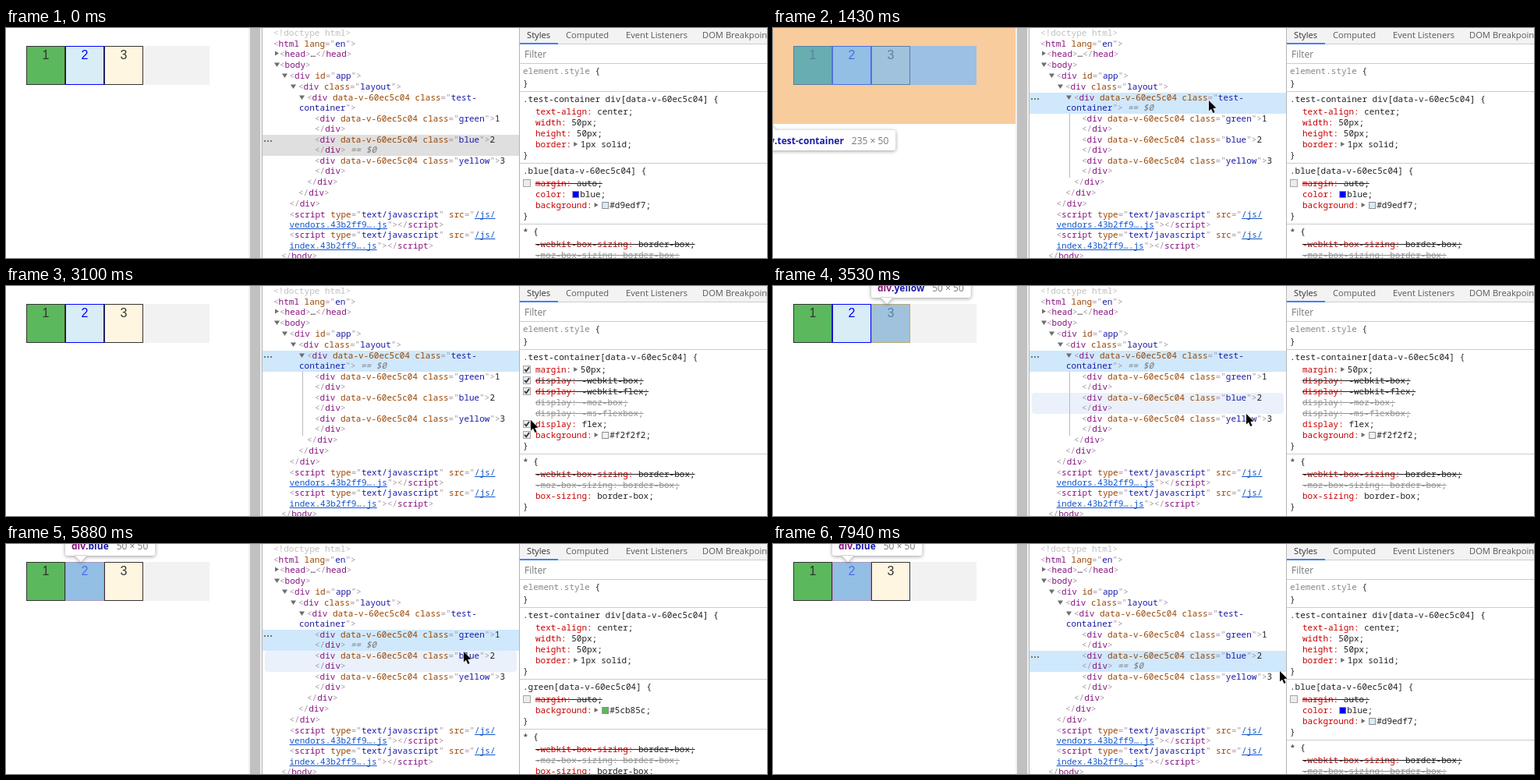
These frames come from a looping animation (976x295 px, 8000 ms). An HTML page with a canvas:

```html
<!DOCTYPE html>
<html lang="en">
<head>
<meta charset="utf-8">
<title>Flexbox inspection</title>
<style>
html, body { margin: 0; width: 100%; height: 100%; overflow: hidden; background: #fff; }
canvas { display: block; width: 976px; height: 295px; }
</style>
</head>
<body>
<canvas id="stage"></canvas>
<script>
const W = 976, H = 295, LOOP = 8000, CH = 6.6;
const MONO = '11px "Noto Sans Mono", monospace';
const UI = '"Open Sans", sans-serif';
const canvas = document.getElementById('stage');
const ctx = canvas.getContext('2d');
const dpr = window.devicePixelRatio || 1;
canvas.width = W * dpr;
canvas.height = H * dpr;

// Markup colours: bracket, tag name, attribute, value, text, link, doctype
const INK = { b: '#a894a6', n: '#881280', a: '#994500', v: '#1a1aa6', t: '#222', l: '#1155cc', d: '#c0c0c0' };
const END = '~b</~ndiv~b>';
const scoped = cls => `~b<~ndiv ~adata-v-60ec5c04 class~b="~v${cls}`;
const item = (cls, label) => scoped(cls) + '~b">~t' + label;
const SCRIPT = '~b<~nscript ~atype~b="~vtext/javascript~b" ~asrc~b="~l/js/';
const SCRIPT_END = '~b"></~nscript~b>';

// x, centre y, markup, x of an open-state triangle
const TREE = [
  [343, 6, '~d<!doctype html>'],
  [343, 20, '~b<~nhtml ~alang~b="~ven~b">'],
  [351, 33, '~b<~nhead~b>~t…~b</~nhead~b>'],
  [351, 47, '~b<~nbody~b>', 344],
  [363.5, 61, '~b<~ndiv ~aid~b="~vapp~b">', 354],
  [375, 75, '~b<~ndiv ~aclass~b="~vlayout~b">', 365],
  [386, 89, scoped('test-'), 376],
  [376, 102, '~vcontainer~b">'],
  [396, 116, item('green', 1)],
  [396, 129, END],
  [396, 143, item('blue', 2)],
  [396, 156, END],
  [396, 170, item('yellow', 3)],
  [396, 183, END],
  [386, 197, END],
  [375, 211, END],
  [363.5, 225, END],
  [363.5, 239, SCRIPT],
  [363.5, 252, '~lvendors.43b2ff9….js' + SCRIPT_END],
  [363.5, 265, SCRIPT],
  [363.5, 279, '~lindex.43b2ff9….js' + SCRIPT_END],
  [353, 292, '~b</~nbody~b>']
];

// Row spans in the tree and the page boxes they highlight
const NODES = {
  container: { top: 83, bottom: 110, end: [455, 102] },
  green: { top: 110, bottom: 137, end: [442, 129], x: 26 },
  blue: { top: 137, bottom: 164, end: [442, 156], x: 76 },
  yellow: { top: 164, bottom: 190, x: 126 },
  layout: { top: 204, bottom: 218 }
};

// Declarations: name, value, flags (s struck, g grey, c unchecked, e expandable), swatch
const ITEM_RULE = ['.test-container div[data-v-60ec5c04]',
  ['text-align', 'center'], ['width', '50px'], ['height', '50px'], ['border', '1px solid', 'e']];
const ALL_RULE = ['*', ['-webkit-box-sizing', 'border-box', 's'],
  ['-moz-box-sizing', 'border-box', 'sg'], ['box-sizing', 'border-box']];
const OFF_MARGIN = ['margin', 'auto', 'sc'];
const STYLES = {
  blue: [ITEM_RULE, ['.blue[data-v-60ec5c04]', OFF_MARGIN, ['color', 'blue', '', '#00f'],
    ['background', '#d9edf7', 'e', '#d9edf7']], ALL_RULE],
  green: [ITEM_RULE, ['.green[data-v-60ec5c04]', OFF_MARGIN,
    ['background', '#5cb85c', 'e', '#5cb85c']], ALL_RULE],
  container: [['.test-container[data-v-60ec5c04]', ['margin', '50px', 'e'],
    ['display', '-webkit-box', 's'], ['display', '-webkit-flex', 's'],
    ['display', '-moz-box', 'sg'], ['display', '-ms-flexbox', 'sg'],
    ['display', 'flex'], ['background', '#f2f2f2', 'e', '#f2f2f2']], ALL_RULE]
};

// Pointer: time, x, y, row fill that lags behind the pointer
const POINTER = [
  [430, 572, 214], [550, 567, 180], [670, 563, 148], [790, 560, 118], [1030, 559, 93],
  [1830, 570, 95], [1950, 592, 99], [2070, 618, 103], [2190, 642, 106], [2300, 659, 108],
  [2410, 665, 108], [2530, 672, 126], [2680, 685, 160], [2830, 693, 177],
  [2950, 688, 176], [3070, 673, 172], [3190, 652, 167], [3310, 634, 162], [3420, 618, 160],
  [3530, 607, 164, 'blue'], [3660, 602, 153], [3930, 597, 146],
  [4920, 592, 141], [5070, 590, 133], [5190, 589, 125], [5310, 588, 121],
  [5670, 587, 129], [5780, 587, 137], [5880, 587, 138],
  [6890, 591, 140], [7010, 597, 142], [7130, 601, 143],
  [7690, 616, 149], [7810, 638, 158], [7940, 650, 163]
];

// Last entry whose start time has passed
const current = (list, t) => list.filter(e => e[0] <= t).pop();
const SELECTED = [[0, 'blue'], [1430, 'container'], [5430, 'green'], [6470, 'blue']];
const SHOWN = [[0, 'blue'], [1550, 'container'], [5550, 'green'], [6590, 'blue']];

function rect(x, y, w, h, color) {
  ctx.fillStyle = color;
  ctx.fillRect(x, y, w, h);
}

function text(s, x, y, color, font = MONO, align = 'left') {
  ctx.font = font;
  ctx.textAlign = align;
  ctx.fillStyle = color;
  ctx.fillText(s, x, y);
}

function poly(points, color) {
  ctx.beginPath();
  points.forEach(([x, y]) => ctx.lineTo(x, y));
  ctx.closePath();
  ctx.fillStyle = color;
  ctx.fill();
}

const triDown = (x, y) => poly([[x, y - 2.5], [x + 7, y - 2.5], [x + 3.5, y + 3]], '#6e6e6e');
const triRight = (x, y) => poly([[x, y - 3], [x + 5, y], [x, y + 3]], '#6e6e6e');

function frameBox(x, y, size, border, fill) {
  rect(x, y, size, size, border);
  rect(x + 1, y + 1, size - 2, size - 2, fill);
}

function markup(x, y, src) {
  for (const part of src.split('~').slice(1)) {
    const s = part.slice(1), w = s.length * CH;
    text(s, x, y + 4, INK[part[0]]);
    if (part[0] === 'l') rect(x, y + 5, w, 1, INK.l);
    x += w;
  }
}

function drawPage() {
  rect(26, 23, 235, 50, '#f2f2f2');
  [['#333', '#5cb85c', '#333'], ['#00f', '#d9edf7', '#00f'], ['#333', '#fff6e1', '#333']]
    .forEach(([border, fill, ink], i) => {
      const x = 26 + 50 * i;
      frameBox(x, 23, 50, border, fill);
      text(i + 1, x + 25, 40, ink, '16px "Liberation Sans", Arial, sans-serif', 'center');
    });
}

function tooltip(name, size, x, edge, below) {
  const bold = 'bold 12px ' + UI, plain = '12px ' + UI;
  ctx.font = bold;
  const tagW = ctx.measureText('div').width;
  const nameW = tagW + ctx.measureText(name).width;
  ctx.font = plain;
  const w = nameW + ctx.measureText(size).width + 27;
  const dir = below ? 1 : -1;
  const top = below ? edge + 8 : edge - 34;
  const base = edge + dir * 8.5;
  ctx.save();
  ctx.shadowColor = 'rgba(0,0,0,.4)';
  ctx.shadowBlur = 5 * dpr;
  ctx.shadowOffsetY = dpr;
  ctx.beginPath();
  ctx.roundRect(x, top, w, 26, 3);
  ctx.moveTo(x + 12, base);
  ctx.lineTo(x + 20, edge);
  ctx.lineTo(x + 28, base);
  ctx.fillStyle = '#fff';
  ctx.fill();
  ctx.restore();
  rect(x + 11, top + 2, 18, 22, '#fff');
  text('div', x + 8, top + 18, '#881280', bold);
  text(name, x + 8 + tagW, top + 18, '#1a1aa6', bold);
  text(size, x + 18 + nameW, top + 18, '#777', plain);
}

function marginArea(alpha) {
  ctx.beginPath();
  ctx.rect(0, 0, 311, 123);
  ctx.rect(26, 23, 235, 50);
  ctx.fillStyle = `rgba(246,178,107,${alpha})`;
  ctx.fill('evenodd');
}

function drawOverlay(hover) {
  const blue = 'rgba(111,168,220,.66)';
  if (hover === 'margin') {
    marginArea(.87);
  } else if (hover === 'container') {
    marginArea(.66);
    rect(26, 23, 235, 50, blue);
    tooltip('.test-container', '235 × 50', -24, 123, true);
  } else if (hover === 'layout') {
    rect(0, 23, 311, 50, blue);
    tooltip('.layout', '335 × 50', -24, 73, true);
  } else if (NODES[hover]) {
    const x = NODES[hover].x;
    rect(x + 1, 24, 48, 48, blue);
    ctx.strokeStyle = 'rgba(255,229,153,.66)';
    ctx.lineWidth = 1;
    ctx.strokeRect(x + .5, 23.5, 49, 49);
    tooltip('.' + hover, '50 × 50', x, 23, false);
  }
}

function drawTree(selected, focused, fill) {
  rect(311, 0, 347, H, '#fff');
  rect(311, 0, 17, H, '#f1f1f1');
  rect(313, 0, 13, H, '#c1c1c1');
  rect(328, 0, 1, H, '#b4b4b4');
  const node = NODES[selected];
  rect(329, node.top, 329, node.bottom - node.top, focused ? '#cfe8fc' : '#dfdfdf');
  if (NODES[fill] && fill !== selected) {
    const { top, bottom } = NODES[fill];
    ctx.beginPath();
    ctx.roundRect(332, top, 323, bottom - top, 4);
    ctx.fillStyle = '#eaf1fb';
    ctx.fill();
  }
  if (selected === 'container') rect(380, 110, 1, 82, '#bbb');
  TREE.forEach(([x, y, src, tri]) => {
    markup(x, y, src);
    if (tri) triDown(tri, y);
  });
  triRight(345, 32.5);
  for (let i = 0; i < 3; i++) rect(331 + 4 * i, node.top + 7, 2, 2, '#777');
  text('== $0', ...node.end.map((v, i) => v + 4 * i), '#777', 'italic ' + MONO);
}

function checkbox(y, on) {
  frameBox(663, y - 5, 10, '#a5a5a5', '#ececec');
  if (!on) return;
  ctx.beginPath();
  ctx.moveTo(665, y);
  ctx.lineTo(667.3, y + 2.3);
  ctx.lineTo(671, y - 3);
  ctx.strokeStyle = '#333';
  ctx.lineWidth = 1.8;
  ctx.stroke();
}

function declaration([name, value, flags = '', swatch], y, checks) {
  const grey = flags.includes('g');
  const label = name + ':';
  let x = 679 + label.length * CH;
  text(label, 679, y + 4, grey ? '#909090' : '#c80000');
  if (flags.includes('e')) {
    triRight(x + 3, y);
    x += 5;
  }
  x += CH;
  if (swatch) {
    frameBox(x + 1, y - 4, 9, '#8a8a8a', swatch);
    x += 11;
  }
  text(value + ';', x, y + 4, grey ? '#909090' : '#222');
  if (flags.includes('s')) {
    rect(679, y, x - 679 + (value.length + 1) * CH, 1, grey ? '#909090' : '#222');
  }
  if (flags.includes('c')) checkbox(y, false);
  else if (checks && !grey) checkbox(y, true);
}

function drawStyles(mode, checks) {
  rect(658, 0, W - 658, H, '#fff');
  rect(658, 0, W - 658, 20, '#f3f3f3');
  rect(658, 20, W - 658, 1, '#ccc');
  rect(659, 19, 49, 2, '#3e82f7');
  rect(658, 0, 1, H, '#b4b4b4');
  [['Styles', 668], ['Computed', 718], ['Event Listeners', 795], ['DOM Breakpoints', 893]]
    .forEach(([s, x], i) => text(s, x, 13, i ? '#5a5a5a' : '#333', '11.2px ' + UI));
  text('Filter', 665, 38, '#757575', '12px ' + UI);
  rect(659, 45, W - 659, 1, '#ccc');
  text('element.style', 663, 59, '#888');
  text('{', 663 + 14 * CH, 59, '#222');
  text('}', 663, 75, '#222');

  let y = 81;
  STYLES[mode].forEach(([selector, ...props], i) => {
    rect(659, y, W - 659, 1, '#ccc');
    text(selector + ' {', 663, y + 14, '#222');
    y += 26;
    for (const prop of props) {
      declaration(prop, y, checks && i === 0);
      y += 14;
    }
    text('}', 663, y + 4, '#222');
    y += 10;
  });
}

function drawPointer(x, y) {
  ctx.save();
  ctx.translate(x, y);
  const shape = [[0, 0], [0, 13.5], [3, 10.8], [5.4, 16], [7.6, 15], [5.3, 10], [9.5, 9.5]];
  ctx.beginPath();
  shape.forEach(p => ctx.lineTo(...p));
  ctx.closePath();
  ctx.strokeStyle = '#fff';
  ctx.lineWidth = 1;
  ctx.stroke();
  ctx.fillStyle = '#000';
  ctx.fill();
  ctx.restore();
}

function target(pointer, mode) {
  if (!pointer) return '';
  const [, x, y] = pointer;
  if (x >= 658) return mode === 'container' && y >= 100 && y < 114 ? 'margin' : '';
  return Object.keys(NODES).find(k => y >= NODES[k].top && y < NODES[k].bottom) || '';
}

function draw(t) {
  const pointer = current(POINTER, t);
  const selected = current(SELECTED, t)[1];
  const mode = current(SHOWN, t)[1];
  const hover = target(pointer, mode);
  ctx.setTransform(dpr, 0, 0, dpr, 0, 0);
  rect(0, 0, W, H, '#fff');
  drawPage();
  drawOverlay(hover);
  drawTree(selected, t >= 1430, pointer && pointer[3] || hover);
  drawStyles(mode, mode === 'container' && pointer[1] >= 658);
  if (pointer) drawPointer(pointer[1], pointer[2]);
}

const start = performance.now();
function tick() {
  draw((performance.now() - start) % LOOP);
  requestAnimationFrame(tick);
}
tick();
</script>
</body>
</html>
```
